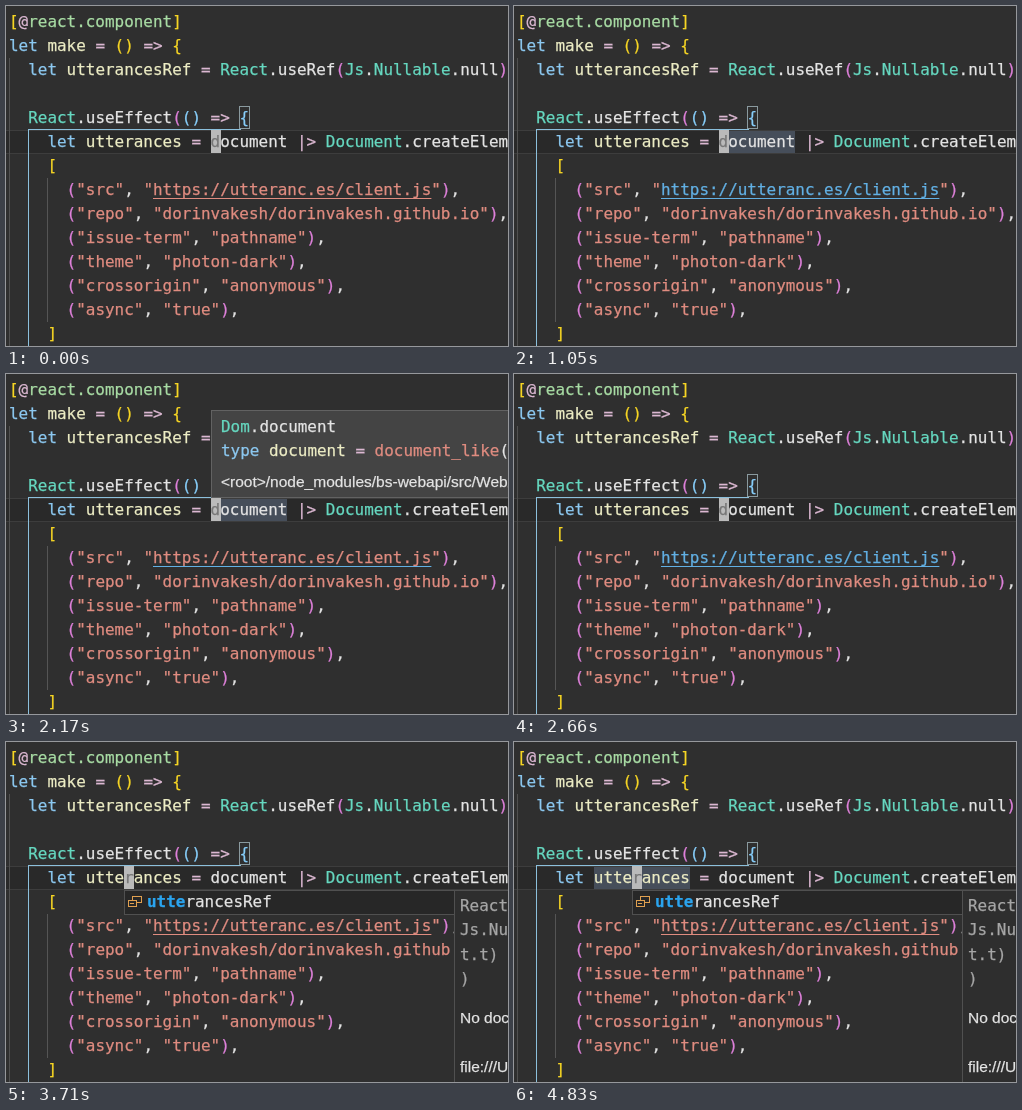
Animation, 502 px wide and 340 px high, one loop 4.9 s. Source, as an HTML page with a canvas:

```html
<!DOCTYPE html>
<html>
<head>
<meta charset="utf-8">
<style>
  html, body { margin: 0; width: 502px; height: 340px; overflow: hidden; background: #2f2f2f; }
  canvas { display: block; }
</style>
</head>
<body>
<canvas id="stage" width="502" height="340"></canvas>
<script>
const ctx = document.getElementById('stage').getContext('2d');
const LOOP = 4900, STEP = 70, CELL = 9.6, LEFT = 3, LINE = 24;
const MONO = '15.95px "DejaVu Sans Mono", monospace';
const SANS = '15.5px "Liberation Sans", sans-serif';
const C = {
  bg: '#2f2f2f', text: '#e4e4e4', string: '#e08c80', link: '#62b0e4', keyword: '#8cc8f0',
  name: '#ececc4', module: '#66d8c0', attr: '#a8dca4', operator: '#dcb8d2', guide: '#8cc0dc'
};
const BRACKETS = ['#f6d524', '#de80da', '#87cefa'];

const code = [
  '[@react.component]',
  'let make = () => {',
  '  let utterancesRef = React.useRef(Js.Nullable.null)',
  '',
  '  React.useEffect(() => {',
  '    let utterances = document |> Document.createElement("script")',
  '    [',
  '      ("src", "https://utteranc.es/client.js"),',
  '      ("repo", "dorinvakesh/dorinvakesh.github.io"),',
  '      ("issue-term", "pathname"),',
  '      ("theme", "photon-dark"),',
  '      ("crossorigin", "anonymous"),',
  '      ("async", "true"),',
  '    ]'
];

const colX = col => LEFT + col * CELL;

// Split the code into coloured tokens; brackets cycle colours by depth.
const tokens = [];
let depth = 0;
code.forEach((line, row) => {
  let last = '';
  for (const m of line.matchAll(/"[^"]*"|(?<=@)[\w.]+|\w+|=>|\|>|\S/g)) {
    const s = m[0];
    let color = C.text;
    if (s[0] === '"') color = C.string;
    else if (last === '@') color = C.attr;
    else if (s === 'let') color = C.keyword;
    else if ('([{'.includes(s)) color = BRACKETS[depth++ % 3];
    else if (')]}'.includes(s)) color = BRACKETS[--depth % 3];
    else if (last === 'let') color = C.name;
    else if (/^[A-Z]/.test(s)) color = C.module;
    else if (/[@=>]/.test(s)) color = C.operator;
    last = s;
    tokens.push({ s, row, col: m.index, color });
  }
});

function rect(x, y, w, h, color) {
  ctx.fillStyle = color;
  ctx.fillRect(x, y, w, h);
}

function frame(x, y, w, h, color) {
  ctx.strokeStyle = color;
  ctx.lineWidth = 1;
  ctx.strokeRect(x + .5, y + .5, w - 1, h - 1);
}

// A hairline stroke gives the text its slightly heavy weight.
function write(s, x, y, color, font = MONO) {
  ctx.font = font;
  ctx.fillStyle = ctx.strokeStyle = color;
  ctx.lineWidth = .25;
  ctx.fillText(s, x, y);
  ctx.strokeText(s, x, y);
}

// Writes pairs of text and colour one after another.
function writeParts(x, y, ...parts) {
  for (let i = 0; i < parts.length; i += 2) {
    write(parts[i], x, y, parts[i + 1]);
    x += parts[i].length * CELL;
  }
}

function drawCode(linkOn, lineOn, wordCol, wordLen) {
  rect(0, 0, 502, 340, C.bg);
  rect(0, 124, 502, 24, '#292929');
  rect(0, 124, 502, 1, '#3d3d3d');
  rect(0, 147, 502, 1, '#3d3d3d');
  rect(3, 52, 1, 288, '#505050');
  rect(41, 172, 1, 144, '#555');
  rect(22, 123, 213, 1, C.guide);
  rect(22, 123, 1, 217, C.guide);
  if (wordLen) rect(Math.round(colX(wordCol)), 125, Math.floor(wordLen * CELL), 22, '#464e5a');
  frame(233, 100, 11, 23, '#8a9a9f');
  for (const t of tokens) write(t.s, colX(t.col), 21 + t.row * LINE, t.color);

  const url = 'https://utteranc.es/client.js', x = colX(15), width = url.length * CELL;
  if (linkOn) {
    rect(x, 174, width, 19, C.bg);
    write(url, x, 189, C.link);
  }
  rect(x, 192, width, 1, lineOn ? C.link : C.string);
}

function drawCursor(col) {
  rect(Math.round(colX(col)), 124, 10, 23, '#bababa');
  write(code[5][col], colX(col), 141, '#777');
}

function drawHover() {
  rect(205, 36, 300, 88, '#444');
  frame(205, 36, 300, 88, '#626262');
  writeParts(215, 58, 'Dom', C.module, '.document', C.text);
  writeParts(215, 82, 'type', C.keyword, ' document', C.name, ' = ', C.operator,
    'document_like', C.string, '(', C.text);
  write('<root>/node_modules/bs-webapi/src/WebApi', 215, 113, C.text, SANS);
}

function drawSuggest() {
  rect(118, 148, 331, 25, '#272727');
  frame(118, 148, 331, 25, '#505050');
  frame(126, 154, 10, 7, '#e0a050');
  rect(122, 158, 9, 7, '#272727');
  frame(122, 158, 9, 7, '#e0a050');
  rect(124, 161, 4, 1, '#e0a050');
  write('utte', 141, 165, '#2ba4ee', 'bold ' + MONO);
  write('rancesRef', 141 + 4 * CELL, 165, C.text);

  rect(448, 148, 60, 200, '#2e2e2e');
  frame(448, 148, 60, 200, '#505050');
  ['React', 'Js.Nu', 't.t)', ')'].forEach((s, i) => write(s, 454, 169 + i * 24.3, '#a6a6a6'));
  write('No documentation', 454, 281, C.text, SANS);
  write('file:///Users', 454, 330, C.text, SANS);
}

function draw(now) {
  const t = Math.floor(now % LOOP / STEP + 1e-6) * STEP;
  const within = (a, b) => t >= a && t < b;
  // The cursor walks left one column per step, from "document" into "utterances".
  const col = 21 - Math.max(0, Math.min(9, (t - 3080) / STEP));
  const blinkOff = within(490, 980) || within(1470, 1960) || within(2450, 2590) || within(4270, 4760);
  const hoverOn = within(1750, 2590);
  const lineOn = within(560, 2870);
  const linkOn = lineOn && !hoverOn;

  if (within(280, 2590)) drawCode(linkOn, lineOn, 21, 8);
  else if (t >= 3990) drawCode(linkOn, lineOn, 8, 10);
  else drawCode(linkOn, lineOn);
  if (!blinkOff) drawCursor(col);
  if (hoverOn) drawHover();
  if (t >= 3710) drawSuggest();
}

const start = performance.now();
function tick() {
  draw(performance.now() - start);
  requestAnimationFrame(tick);
}
tick();
</script>
</body>
</html>
```
